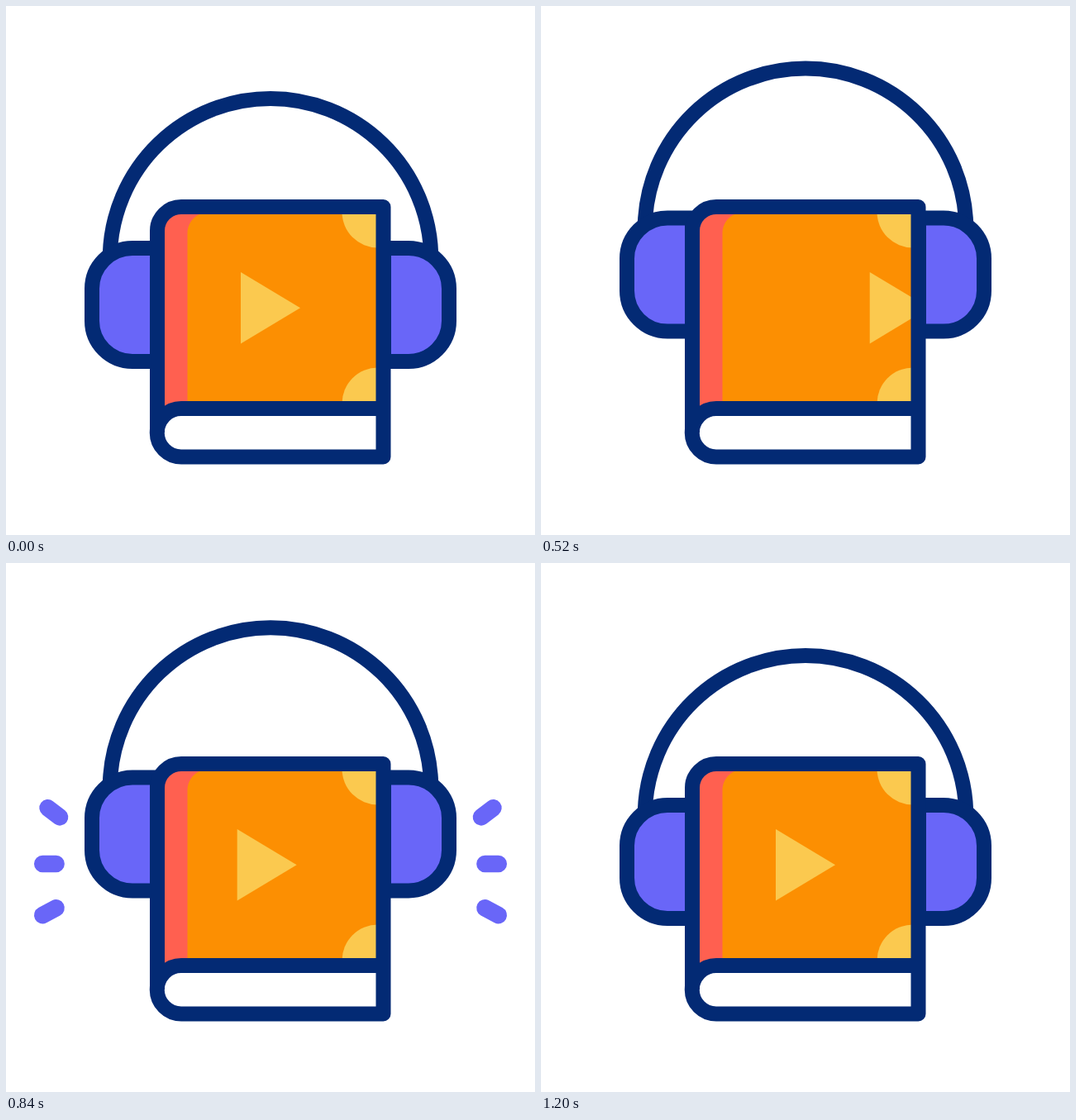
These frames come from a looping animation (640x640 px, 2.04 s). An HTML page:

```html
<!DOCTYPE html>
<html lang="en">
<head>
<meta charset="utf-8">
<title>Audiobook</title>
<style>
  html, body { margin: 0; width: 100%; height: 100%; overflow: hidden; background: #fff; }
  svg { display: block; width: 100%; height: 100%; }
  .line { stroke: #032a74; stroke-width: 18; stroke-linejoin: round; }
  .rays { stroke: #6966f8; stroke-width: 20.5; stroke-linecap: round; }
</style>
</head>
<body>
<svg viewBox="0 0 640 640" fill="none">
  <defs>
    <clipPath id="cover"><path d="M183 487V272A29 29 0 0 1 212 243H456.5V487H212A29 29 0 0 0 183 516Z"/></clipPath>
    <path id="pad" class="line" fill="#6966f8" d="M183 293H153A49 49 0 0 0 104 342V381A49 49 0 0 0 153 430H183Z"/>
    <path id="rays" class="rays"/>
  </defs>

  <use href="#rays"/>
  <use href="#rays" transform="matrix(-1 0 0 1 640 0)"/>

  <g id="headphones">
    <path class="line" d="M125.8 300A194.3 194.3 0 0 1 514.2 300"/>
    <use href="#pad"/>
    <use href="#pad" transform="matrix(-1 0 0 1 640 0)"/>
  </g>

  <path fill="#fff" d="M456.5 487H212A29 29 0 0 0 212 545.5H456.5Z"/>
  <g clip-path="url(#cover)">
    <path fill="#ff6050" d="M180 240H460V520H180Z"/>
    <path fill="#fc8f02" d="M219.5 500V275C219.5 264 226 255 236 251V240H460V500Z"/>
    <g fill="#fbc94f">
      <circle cx="450" cy="249" r="43.5"/>
      <circle cx="450" cy="481" r="43.5"/>
      <path id="play" d="M0 322L72 365.2L0 408.5Z"/>
    </g>
  </g>
  <path class="line" d="M183 516V272A29 29 0 0 1 212 243H456.5V545.5H212A29.25 29.25 0 0 1 212 487H456.5"/>
</svg>
<script>
const LOOP = 2040, STEP = 40;
const $ = id => document.getElementById(id);

const ease = (t, from, to) => {
  const p = Math.min(1, Math.max(0, (t - from) / (to - from)));
  return p * p * (3 - 2 * p);
};

// Eased value through [time, value] keys
function track(t, keys) {
  let value = keys[0][1];
  for (let i = 1; i < keys.length; i++) {
    const [t0, v0] = keys[i - 1], [t1, v1] = keys[i];
    if (t >= t0) value = t1 > t0 ? v0 + (v1 - v0) * ease(t, t0, t1) : v1;
  }
  return value;
}

const lift = [[350, 0], [600, -48], [700, -48], [1085, 0]];
const slide = [[0, 284], [360, 251.3], [600, 449], [600, 109], [900, 299.5], [1200, 284]];

// Each ray: inner end x, y, then outer end x, y
const rays = [
  [84, 322, 43.3, 290.7],
  [82, 364, 36, 364],
  [82, 406, 36, 430.5]
];

function rayPath(t) {
  const head = ease(t, 650, 910), tail = ease(t, 716, 976);
  if (head <= 0 || tail >= 1) return "";
  return rays.map(([x0, y0, x1, y1]) => {
    const at = k => `${x0 + (x1 - x0) * k} ${y0 + (y1 - y0) * k}`;
    return `M${at(tail)}L${at(head)}`;
  }).join("");
}

function draw(now) {
  const t = Math.floor(now % LOOP / STEP) * STEP;
  $("headphones").setAttribute("transform", `translate(0 ${track(t, lift)})`);
  $("play").setAttribute("transform", `translate(${track(t, slide)} 0)`);
  $("rays").setAttribute("d", rayPath(t));
}

const start = performance.now();
function loop() {
  draw(performance.now() - start);
  requestAnimationFrame(loop);
}
loop();
</script>
</body>
</html>
```
